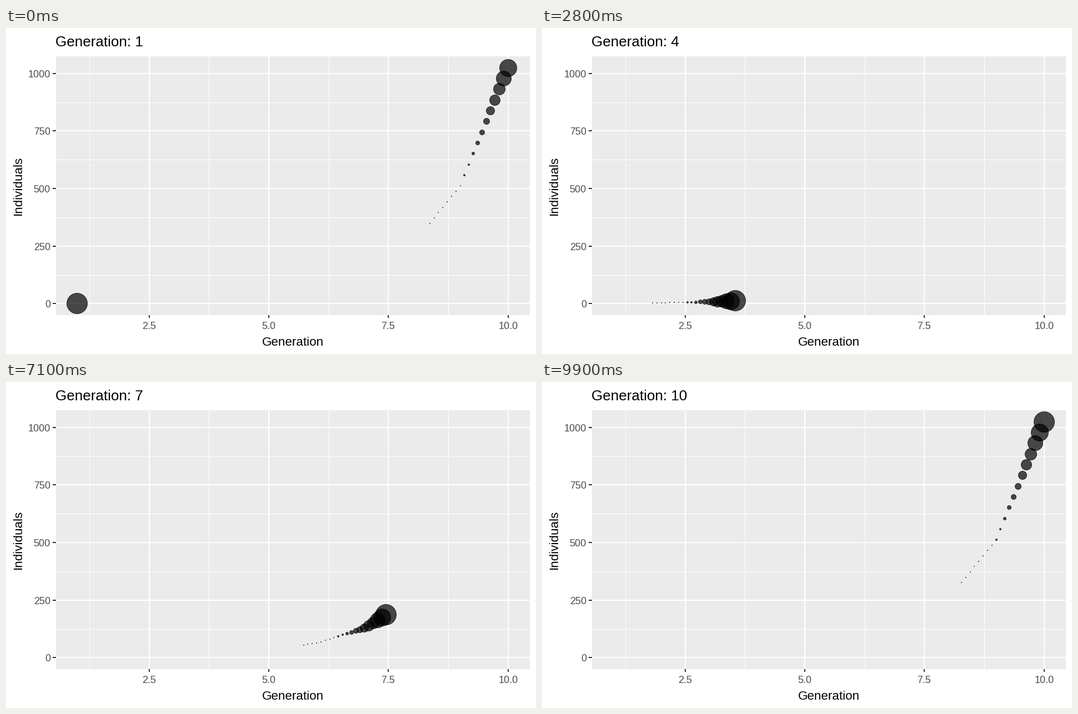
Write a matplotlib script that moves like this. It is 954 px wide and 587 px high and loops after 10000 ms.

```python
import matplotlib.pyplot as plt
import numpy as np
from matplotlib.animation import FuncAnimation
from matplotlib.patches import Circle, Rectangle

W, H, DPI = 954, 587, 64
FRAMES, INTERVAL = 100, 100
WAKE = 20
LEFT, TOP, RIGHT, BOTTOM = 90, 51, 943, 517

plt.rcParams["font.family"] = "Liberation Sans"
fig = plt.figure(figsize=(W / DPI, H / DPI), dpi=DPI, facecolor="white")
ax = fig.add_axes([0, 0, 1, 1])
ax.set_xlim(0, W)
ax.set_ylim(H, 0)
ax.axis("off")


def px(gen):
    return int(np.floor(128.4 + 86.15 * (gen - 1) + 0.5))


def py(count):
    return int(np.floor(496.45 - 0.41461 * count + 0.5))


def box(x0, y0, x1, y1, color, z):
    ax.add_patch(Rectangle((x0, y0), x1 - x0, y1 - y0, fc=color, lw=0, zorder=z))


def label(x, y, text, size, color="black", **kw):
    kw.setdefault("va", "baseline")
    return ax.text(x, y, text, fontsize=size * 72 / DPI, color=color, zorder=5, **kw)


# Panel and minor grid
box(LEFT, TOP, RIGHT, BOTTOM, "#EBEBEB", 0)
for gen in np.arange(1.25, 10, 2.5):
    box(px(gen), TOP, px(gen) + 1, BOTTOM, "white", 1)
for count in range(125, 1000, 250):
    box(LEFT, py(count), RIGHT, py(count) + 1, "white", 1)

# Major grid, ticks and tick labels
for gen in np.arange(2.5, 10.1, 2.5):
    x = px(gen)
    box(x - 1, TOP, x + 1, BOTTOM, "white", 2)
    box(x - 1, BOTTOM, x + 1, BOTTOM + 5, "#333333", 2)
    label(x, 542, f"{gen:.1f}", 18, "#4D4D4D", ha="center")
for count in range(0, 1001, 250):
    y = py(count)
    box(LEFT, y - 1, RIGHT, y + 1, "white", 2)
    box(LEFT - 6, y - 1, LEFT, y + 1, "#333333", 2)
    label(80, y + 7, str(count), 18, "#4D4D4D", ha="right")

label(516, 572, "Generation", 22.4, ha="center")
label(29.5, 284, "Individuals", 22.4, ha="right", va="center", rotation=90,
      rotation_mode="default").set(ha="center", x=22)
title = label(89, 33, "", 26)

# Population doubles each generation, linear in between
gens = np.arange(1, 11)
time = 1 + np.arange(FRAMES) * 9 / (FRAMES - 1)
size = np.interp(time, gens, 2.0 ** gens)
spots = [(px(g), py(n)) for g, n in zip(time, size)]

# Wake radii shrink with a cubic falloff, in whole pixels
ink = (0, 0, 0, 0.7)
dots = []
for k in range(1, WAKE + 1):
    r = max(1, int(18.45 * (k / WAKE) ** 3 + 0.6))
    dot = Circle((0, 0), r - 0.5, fc=ink, ec=ink, lw=72 / DPI, zorder=4)
    dots.append(ax.add_patch(dot))


def update(i):
    title.set_text(f"Generation: {round(time[i])}")
    for k, dot in enumerate(dots, 1):
        dot.center = spots[(i - WAKE + k) % FRAMES]
    return [title, *dots]


anim = FuncAnimation(fig, update, frames=FRAMES, interval=INTERVAL,
                     repeat=True, repeat_delay=0)
plt.show()
```
